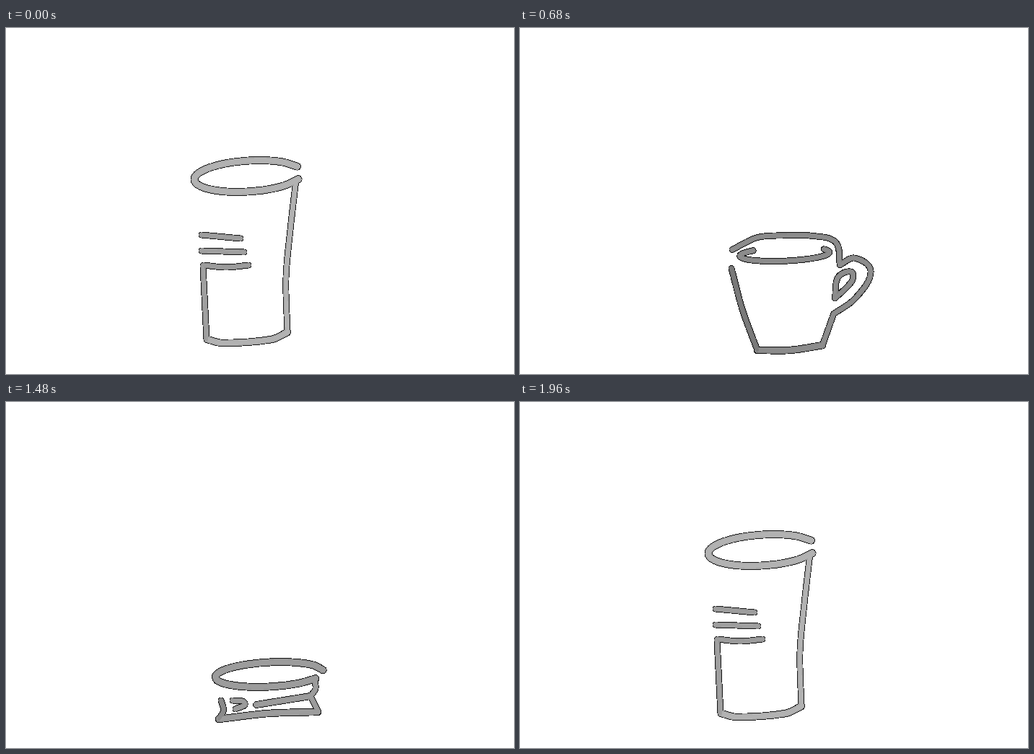
An HTML page for the animation above (2.08 s loop, 704x480 px).

```html
<!DOCTYPE html>
<html lang="en">
<head>
<meta charset="utf-8">
<title>Glass to mug</title>
<style>
  html, body { margin: 0; width: 100%; height: 100%; overflow: hidden; background: #fff; }
  svg { display: block; width: 704px; height: 480px; }
  path { fill: none; stroke-linecap: round; stroke-linejoin: round; shape-rendering: crispEdges; }
</style>
</head>
<body>
<svg id="stage" viewBox="0 0 704 480"></svg>
<script>
const LOOP = 2080;
const STEP = 80;
const WIDTHS = { rim: 11, bottom: 10.5, arm: 10 };
const SHADE = { left: -18, mark1: -20, mark2: -18, mark3: -22 };

const lerp = (a, b, k) => a + (b - a) * k;
const mix = (p, q, k) => p.map((v, i) => lerp(v, q[i], k));

// Part of a tilted ellipse, anticlockwise between two angles.
function arc(cx, cy, rx, ry, tilt, from, to) {
  const steps = 12;
  return Array.from({ length: steps + 1 }, (_, i) => {
    const a = lerp(from, to, i / steps), x = rx * Math.cos(a);
    return [cx + x, cy - ry * Math.sin(a) + tilt * x];
  });
}

// An ellipse left open on the right by the two given angles.
const rim = (cx, cy, rx, ry, tilt, upper, lower) =>
  arc(cx, cy, rx, ry, tilt, upper, 2 * Math.PI - lower);

// A line whose middle is pushed sideways.
function bow(x1, y1, x2, y2, push = 0) {
  const dx = x2 - x1, dy = y2 - y1, k = push / Math.hypot(dx, dy);
  return [[x1, y1], [(x1 + x2) / 2 - dy * k, (y1 + y2) / 2 + dx * k], [x2, y2]];
}

const via = (...points) => points;

const glass = { tone: 178, lines: {
  rim: rim(336, 205.5, 75, 21.5, -.06, .45, .4),
  right: bow(402, 210, 395, 270),
  side: bow(395, 270, 390, 422, 4.5),
  bottom: via([390, 422], [368, 432], [300, 437], [279, 432]),
  left: bow(278, 432, 273, 330),
  mark1: bow(271, 287, 325, 292),
  mark2: bow(271, 309, 330, 311),
  mark3: bow(274, 329, 336, 329, 3)
} };

const crumpled = { tone: 156, lines: {
  rim: rim(349, 216.3, 83, 20.5, -.025, .58, .5),
  right: bow(419, 223, 409, 257),
  arm: bow(409, 257, 347, 293, 5),
  side: via([390, 267], [406, 295], [377, 360], [400, 420]),
  bottom: via([400, 420], [375, 430], [335, 432], [280, 424]),
  left: bow(279, 424, 294, 378),
  mark1: via([286, 258], [317, 272], [298, 282], [274, 279]),
  mark2: bow(289, 305, 312, 364),
  mark3: via([280, 339], [296, 378], [328, 387]),
  hook: via([336, 312], [336, 333], [358, 349])
} };

const face = { tone: 166, lines: {
  rim: rim(358, 273.5, 91, 21, -.09, .75, .78),
  right: bow(423, 285, 400, 326),
  arm: via([400, 326], [345, 334], [329, 346], [360, 351], [401, 350]),
  side: via([400, 328], [417, 356], [411, 400], [402, 429]),
  bottom: via([402, 429], [335, 429], [297, 433]),
  left: bow(296, 433, 292, 413),
  cheek: via([284, 407], [286, 382], [275, 358], [281, 336]),
  temple: bow(270, 307, 280, 327),
  brow: bow(280, 327, 318, 309),
  browEnd: bow(318, 309, 335, 315),
  nose: bow(300, 378, 319, 371),
  mouth: bow(284, 406, 328, 405)
} };

const flat = { tone: 156, lines: {
  rim: rim(365, 378, 75, 17, -.05, .15, .55),
  right: bow(428, 386, 422, 408, -4),
  arm: bow(422, 408, 347, 420),
  side: bow(422, 408, 432, 428),
  bottom: bow(432, 430, 295, 440, 3),
  left: bow(295, 440, 298, 414, 5),
  nose: via([314, 414], [331, 418], [318, 426])
} };

const mug = { tone: 140, lines: {
  top: via([292, 241], [328, 216], [368, 212], [408, 213], [440, 226], [446, 272]),
  inner: arc(367, 250, 64, 14, -.06, 2.35, 2 * Math.PI + .5),
  handle: via([446, 272], [467, 258], [490, 285], [468, 340], [437, 372]),
  hole: via([439, 340], [443, 298], [462, 286], [463, 305], [439, 340]),
  right: bow(437, 372, 421, 436),
  bottom: bow(421, 436, 328, 446, -5),
  left: bow(291, 279, 328, 446, 3)
} };

function sample(points, u) {
  const f = u * (points.length - 1);
  const i = Math.min(Math.floor(f), points.length - 2);
  return mix(points[i], points[i + 1], f - i);
}

// Shared strokes glide; the others belong to the nearer pose.
function blend(a, b, k) {
  const lines = {};
  for (const name in { ...a.lines, ...b.lines }) {
    const p = a.lines[name], q = b.lines[name];
    if (p && q) {
      const n = Math.max(p.length, q.length) - 1;
      lines[name] = Array.from({ length: n + 1 }, (_, i) => mix(sample(p, i / n), sample(q, i / n), k));
    } else if (k < .5 ? p : q) lines[name] = p || q;
  }
  return { tone: lerp(a.tone, b.tone, k), lines };
}

// Scales a pose about (x, y), keeping the line weight.
function stretch({ tone, lines }, x, y, sx, sy) {
  const scaled = {};
  for (const name in lines)
    scaled[name] = lines[name].map(p => [lerp(x, p[0], sx), lerp(y, p[1], sy)]);
  return { tone, lines: scaled };
}

// Curve through the points, with handles a third of each span long.
function smooth(points) {
  const at = i => points[Math.max(0, Math.min(points.length - 1, i))];
  const handle = (i, length) => {
    const p = at(i - 1), q = at(i + 1), k = length / (Math.hypot(q[0] - p[0], q[1] - p[1]) || 1);
    return at(i).map((v, c) => v + (q[c] - p[c]) * k);
  };
  return points.slice(1).reduce((d, end, i) => {
    const third = Math.hypot(end[0] - points[i][0], end[1] - points[i][1]) / 3;
    return `${d}C${handle(i, third)} ${handle(i + 1, -third)} ${end}`;
  }, 'M' + points[0]);
}

function markup({ tone, lines }) {
  const grey = v => `rgb(${[v, v, v].map(Math.round)})`;
  const layer = (inset, light) => Object.keys(lines).map(name =>
    `<path d="${smooth(lines[name])}" stroke="${grey(light * (tone + (SHADE[name] || 0)))}" stroke-width="${(WIDTHS[name] || 9) - inset}"/>`
  ).join('');
  return layer(0, .15) + layer(1.8, .92) + layer(4.5, 1);
}

const drawings = [
  glass,
  blend(glass, crumpled, 1 / 3),
  blend(glass, crumpled, 2 / 3),
  crumpled,
  face,
  blend(face, flat, .5),
  flat,
  stretch(flat, 360, 441, 1, 1.35),
  stretch(mug, 360, 449, .97, .68),
  stretch(mug, 360, 449, .98, .92),
  mug
].map(markup);

// Steps are even except for longer holds on the first and the last two drawings.
const starts = drawings.map((_, i) => i ? 120 + STEP * (i - 1) : 0);
starts[drawings.length - 1] = 920;

// The second half of the loop plays the first half backwards.
function drawingAt(t) {
  const passed = t < LOOP / 2 ? s => s <= t : s => s < LOOP - t;
  return Math.max(0, starts.filter(passed).length - 1);
}

const stage = document.getElementById('stage');
const begin = performance.now();
let shown = -1;

function tick() {
  const index = drawingAt((performance.now() - begin) % LOOP);
  if (index !== shown) stage.innerHTML = drawings[shown = index];
  requestAnimationFrame(tick);
}
tick();
</script>
</body>
</html>
```
